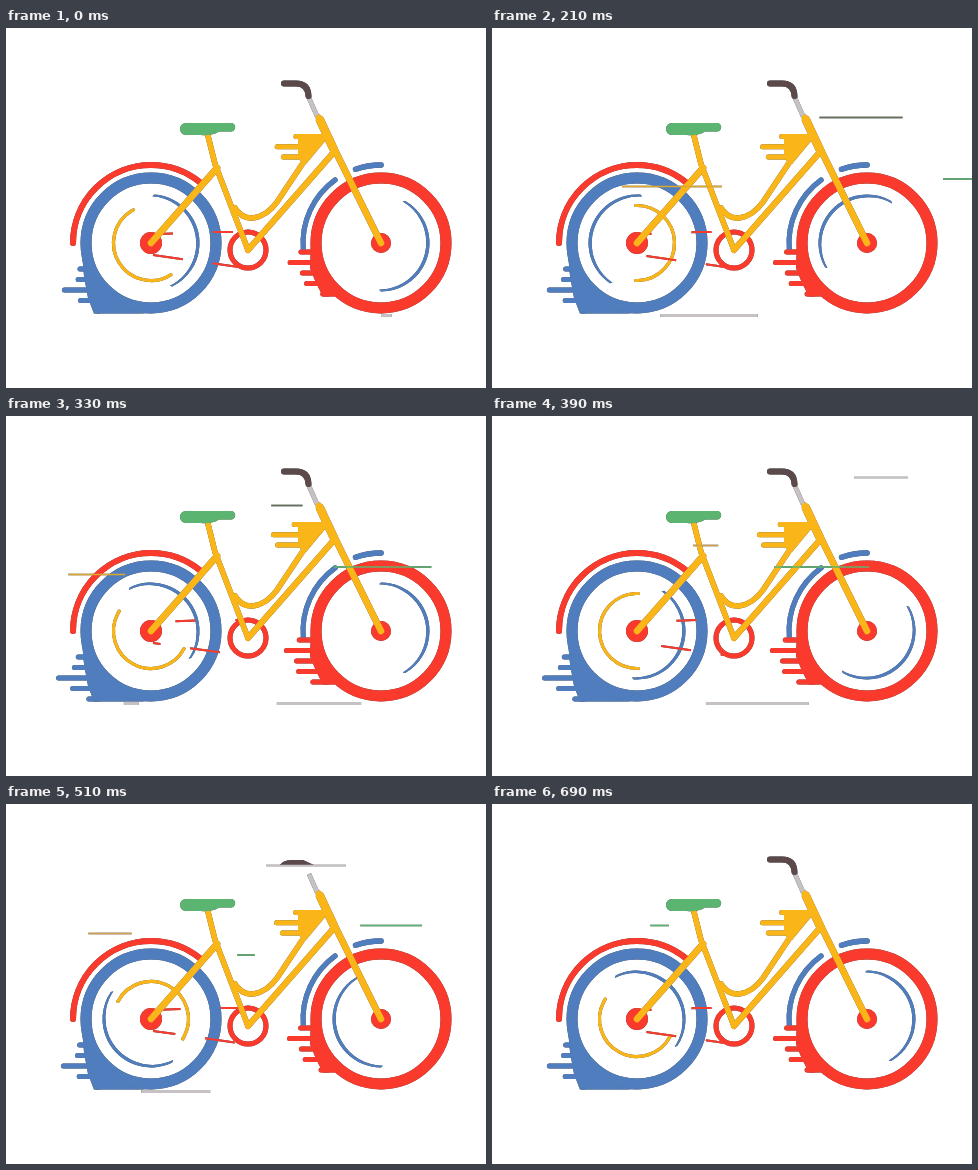
An HTML page with a canvas that plays this animation: 480x360 px, repeating every 720 ms.

```html
<!DOCTYPE html>
<html lang="en">
<head>
<meta charset="utf-8">
<title>Bicycle</title>
<style>
html, body { margin: 0; width: 100%; height: 100%; overflow: hidden; background: #fff; }
canvas { display: block; filter: drop-shadow(0 0 .5px #000b); }
</style>
</head>
<body>
<canvas width="480" height="360"></canvas>
<script>
const ctx = document.querySelector('canvas').getContext('2d');
const RED = '#f93a2d', BLUE = '#4f7dbd', YELLOW = '#fab619', GREEN = '#5bb46f', GRAY = '#c6c2c4', GRIP = '#5c4a4b';
const LOOP = 720, STEP = 30, RAD = Math.PI / 180;
const REAR = [145, 215], FRONT = [375, 215];

function stroke(path, color, width, cap = 'round') {
  ctx.strokeStyle = color;
  ctx.lineWidth = width;
  ctx.lineCap = cap;
  ctx.lineJoin = 'round';
  ctx.stroke(new Path2D(path));
}

function fill(path, color) {
  ctx.fillStyle = color;
  ctx.fill(new Path2D(path));
}

function arc([x, y], r, from, to, color, width) {
  const path = new Path2D();
  path.arc(x, y, r, from * RAD, to * RAD);
  stroke(path, color, width);
}

function disc([x, y], r, color) {
  ctx.beginPath();
  ctx.arc(x, y, r, 0, 7);
  ctx.fillStyle = color;
  ctx.fill();
}

// Tapered glint on a wheel, 150 degrees long
function crescent([x, y], from) {
  const a = from * RAD, b = a + 150 * RAD, mid = (a + b) / 2;
  ctx.beginPath();
  ctx.arc(x, y, 48.5, a, b);
  ctx.arc(x - 2 * Math.cos(mid), y - 2 * Math.sin(mid), 47.2, b, a, true);
  ctx.fillStyle = BLUE;
  ctx.fill();
}

// Evenly spaced bars; the lower ones swing further
function streaks(lefts, y, gap, end, slant, t, color) {
  const swing = Math.cos(2 * Math.PI * t / 240);
  lefts.forEach((x, i) => {
    stroke(`M${x + (1 + 1.2 * i) * swing} ${y + gap * i}H${end + slant * i}`, color, 5);
  });
}

// The front end eases out and the back end eases in, so the line grows and then shrinks
function wind(t, y, color, start, duration, from, to, width = 1.5) {
  const u = (t - start + LOOP) % LOOP / duration;
  if (u >= 1) return;
  const left = from + (to - from) * (1 - (1 - u) ** 1.7);
  const right = from + (to - from) * u ** 1.7;
  stroke(`M${left} ${y}H${right}`, color, width, 'butt');
}

function winds(t) {
  for (const start of [-8, 232]) wind(t, 287.5, GRAY, start, 350, 386, 117, 3);
  wind(t, 89.5, '#65705a', 60, 300, 477, 261);
  wind(t, 158.5, '#dca92c', 30, 360, 310, 50);
  wind(t, 151, GREEN, 180, 345, 488, 230);
  wind(t, 61.5, GRAY, 330, 300, 430, 215);
  wind(t, 129.5, '#cfa04d', 370, 180, 230, 70);
  wind(t, 121.5, GREEN, 470, 230, 430, 157);
}

function chain(t) {
  const shift = t % 240 / 4;
  ctx.setLineDash([20, 40]);
  ctx.lineDashOffset = 3 - shift;
  stroke('M150 206L205 204H240', RED, 2, 'butt');
  ctx.setLineDash([30, 30]);
  ctx.lineDashOffset = shift;
  stroke('M147 227L240 240', RED, 2, 'butt');
  ctx.setLineDash([]);
}

function wheels(t) {
  arc(REAR, 78, 180, 309, RED, 6);
  arc(FRONT, 78, 175, 234, BLUE, 5);
  arc(FRONT, 78, 251, 270, BLUE, 5.5);

  fill('M75 215L78 248 82 270 88 285.5H145A65 65 0 0 1 80 215Z', BLUE);
  streaks([73, 70, 55, 70, 87], 241, 10.5, 84, 2, t, BLUE);
  arc(REAR, 65, 0, 360, BLUE, 11);

  fill('M305 215L304 240 310 255 317 268.5H335A65 65 0 0 1 310 215Z', RED);
  streaks([294, 282, 293, 296, 311], 224, 10.5, 306, 4, t, RED);
  arc(FRONT, 65, 0, 360, RED, 11);

  crescent(REAR, t - 86);
  crescent(FRONT, t - 60);
  arc(REAR, 37.5, t + 58, t + 242, YELLOW, 3.2);
}

function frame(t) {
  disc(REAR, 11, RED);
  disc(FRONT, 10, RED);
  arc([242, 222], 18, 0, 360, RED, 5);

  fill('M292 106H316L320 112 300 136 292 131Z', YELLOW);
  streaks([289, 269, 274], 108.5, 10.3, 294, 0, t, YELLOW);

  stroke('M211 140L145 215', YELLOW, 6.5);
  stroke('M202 108L209 136 242 222', YELLOW, 5.5);
  stroke('M229 180Q236 191 247 190Q261 188 271 174L299 132 318 108', YELLOW, 5.5);
  stroke('M242 222L328 124', YELLOW, 6);
  stroke('M313 90L375 215', YELLOW, 6.5);
  stroke('M314 92L328 122', YELLOW, 8.5);

  fill('M180 95H225a4.2 4.2 0 0 1 0 8.4H213Q206 108 195 107H180a6 6 0 0 1 0-12Z', GREEN);
}

function handlebar(t) {
  stroke('M303 70L311 88', GRAY, 4.5, 'butt');
  if (t >= 420 && t < 570) fill('M273 62Q277 56 285 56H297L310 62Z', GRIP);
  else stroke('M278 55.5H290Q302 55.5 302.5 68', GRIP, 6);
}

function draw(now) {
  const t = Math.floor(now % LOOP / STEP) * STEP;
  ctx.clearRect(0, 0, 480, 360);
  wheels(t);
  chain(t);
  handlebar(t);
  frame(t);
  winds(t);
}

const start = performance.now();
function tick() {
  draw(performance.now() - start);
  requestAnimationFrame(tick);
}
tick();
</script>
</body>
</html>
```
